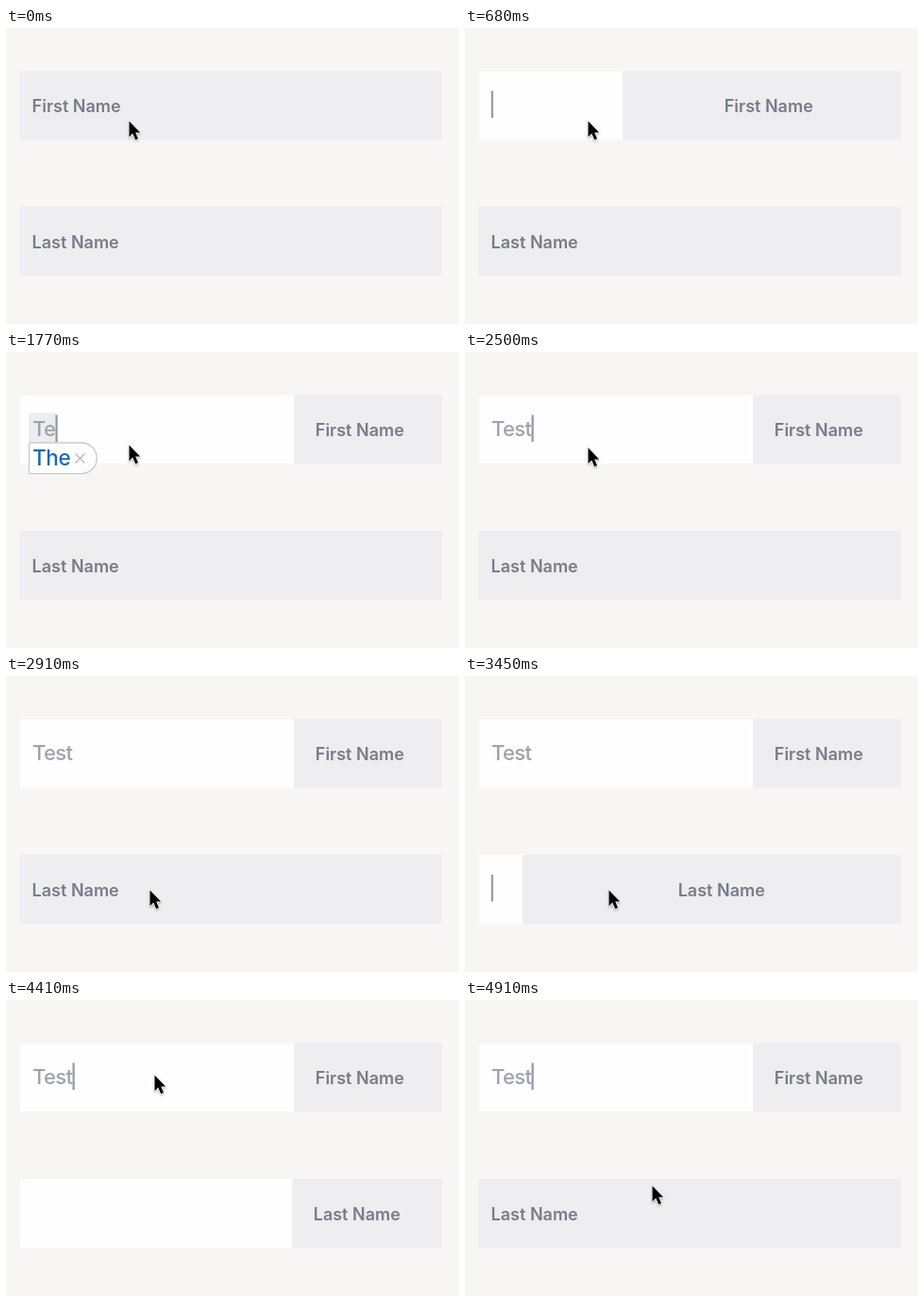
Write an HTML page that moves like this. It is 480 by 313 pixels and loops after 4.96 s.

```html
<!DOCTYPE html>
<html lang="en">
<head>
<meta charset="utf-8">
<title>Sliding label form</title>
<style>
  html, body { margin: 0; width: 100%; height: 100%; overflow: hidden; background: #f7f6f5; }
  svg { display: block; width: 480px; height: 313px; }
  text { font-family: Inter, "Noto Sans", sans-serif; }
  .panel { fill: #eeedef; }
  .field { fill: #fefefe; }
  .label { font-size: 18px; font-weight: 600; fill: #777d89; }
  .value { font-size: 22px; font-weight: 500; letter-spacing: -.65px; fill: #9ba3ad; }
  .caret { fill: #9199a6; }
  .hint { font-size: 22.5px; font-weight: 500; letter-spacing: -.4px; fill: #1f66b5; }
</style>
</head>
<body>
<svg viewBox="0 0 480 313">
  <defs>
    <filter id="soft" x="-50%" y="-50%" width="200%" height="200%">
      <feDropShadow dx="0" dy="1.2" stdDeviation="1" flood-opacity=".35"/>
    </filter>
  </defs>

  <g id="first">
    <rect class="panel" x="14.5" y="45.5" width="447.5" height="73"/>
    <rect class="field" x="14.5" y="45.5" height="73"/>
    <text class="label" y="89">First Name</text>
    <rect id="mark" x="24" y="64.5" width="29" height="31" fill="#ebedee"/>
    <text class="value" id="typed" x="28" y="89"></text>
    <rect class="caret" y="66.5" width="2.2" height="28.5"/>
  </g>

  <g id="last">
    <rect class="panel" x="14.5" y="189" width="447.5" height="73"/>
    <rect class="field" x="14.5" y="189" height="73"/>
    <text class="label" y="232.5">Last Name</text>
    <rect class="caret" x="27.7" y="210" width="2.2" height="28.5"/>
  </g>

  <g id="popup">
    <path d="M26 96H80A16.3 16.3 0 0 1 80 128.6H26Q24.5 128.6 24.5 127V97.5Q24.5 96 26 96Z"
          fill="#fefefe" stroke="#c9cacd" stroke-width="1.3"/>
    <text class="hint" x="28" y="120.3">The</text>
    <path d="M73.5 107.5l10 10m0-10l-10 10" stroke="#b4b6ba" stroke-width="1.3" fill="none"/>
  </g>

  <g id="pointer" filter="url(#soft)">
    <path d="M.5 .5V17.2L4.3 13.6L7.2 20.3L10 19.1L7.2 12.6H12.2Z"
          fill="#000" stroke="#fff" stroke-width="1.1" stroke-linejoin="round" paint-order="stroke"/>
  </g>
</svg>

<script>
const LOOP = 4960, STEP = 1000 / 22;
const SLIDE = 500, LAG = 70;
const FOCUS_FIRST = 549.5, FOCUS_LAST = 3368, BLUR_LAST = 4408.4;
const $ = s => document.querySelector(s);

// cubic-bezier(.2, 1, .3, 1)
function ease(x) {
  if (x <= 0) return 0;
  if (x >= 1) return 1;
  let lo = 0, hi = 1;
  for (let i = 0; i < 24; i++) {
    const s = (lo + hi) / 2, r = 1 - s;
    if (.6 * r * r * s + .9 * r * s * s + s * s * s < x) lo = s; else hi = s;
  }
  return 1 - (1 - lo) ** 3;
}

// Piecewise linear value through [time, value] points
function along(t, points) {
  let [t0, v0] = points[0];
  for (const [t1, v1] of points) {
    if (t < t1) return t <= t0 ? v0 : v0 + (v1 - v0) * (t - t0) / (t1 - t0);
    [t0, v0] = [t1, v1];
  }
  return v0;
}

function slide(id, t, open, close = Infinity) {
  const back = 1 - ease((t - close) / SLIDE);
  const label = ease((t - open) / SLIDE) * back;
  const field = ease((t - open - LAG) / SLIDE) * back;
  $(id + ' .field').setAttribute('width', 290.7 * field);
  $(id + ' .label').setAttribute('x', 27.6 + 300.2 * label);
}

const keys = [[1500, 'T'], [1545, 'Te'], [1909, 'Tes'], [2045, 'Test']];
const typedAt = t => keys.reduce((s, [at, text]) => t >= at ? text : s, '');

function firstCaret(t) {
  if (t < FOCUS_FIRST + LAG / 2) return 0;
  if (t < 1500) return along(t, [[1140, 1], [1360, 0]]);
  if (t < FOCUS_LAST) return along(t, [[2610, 1], [2830, 0], [3010, 0], [3270, 1]]);
  return t < BLUR_LAST ? 0 : 1;
}

function lastCaret(t) {
  if (t < FOCUS_LAST + LAG / 2 || t >= BLUR_LAST) return 0;
  return along(t, [[3915, 1], [4135, 0]]);
}

const smooth = u => u * u * (3 - 2 * u);
const moves = [
  [2460, 2910, 152, 226, smooth],
  [3500, 4140, 157, 79, u => 1 - (1 - u) ** 1.45],
  [4480, 4909, 198, 196, smooth]
];

function pointerAt(t) {
  let x = 130, y = 98;
  for (const [from, to, nx, ny, curve] of moves) {
    const u = curve(Math.min(1, Math.max(0, (t - from) / (to - from))));
    // sideways drift comes late in the stroke
    x += (nx - x) * u * u;
    y += (ny - y) * u;
  }
  return [x, y];
}

function draw(t) {
  slide('#first', t, FOCUS_FIRST);
  slide('#last', t, FOCUS_LAST, BLUR_LAST);

  const typed = $('#typed'), text = typedAt(t);
  if (typed.textContent !== text) typed.textContent = text;
  const caret = $('#first .caret');
  caret.setAttribute('x', text ? 28.2 + typed.getComputedTextLength() : 27.7);
  caret.setAttribute('opacity', firstCaret(t));
  $('#last .caret').setAttribute('opacity', lastCaret(t));

  const hint = t < 1770 ? 0 : along(t, [[1870, 1], [2130, 0]]);
  $('#mark').setAttribute('opacity', hint);
  $('#popup').setAttribute('opacity', hint);

  $('#pointer').setAttribute('transform', `translate(${pointerAt(t)})`);
}

const start = performance.now();
function tick() {
  const ms = Math.floor((performance.now() - start) % LOOP / 10) * 10;
  draw(Math.floor((ms + 5) / STEP) * STEP);
  requestAnimationFrame(tick);
}
tick();
</script>
</body>
</html>
```
